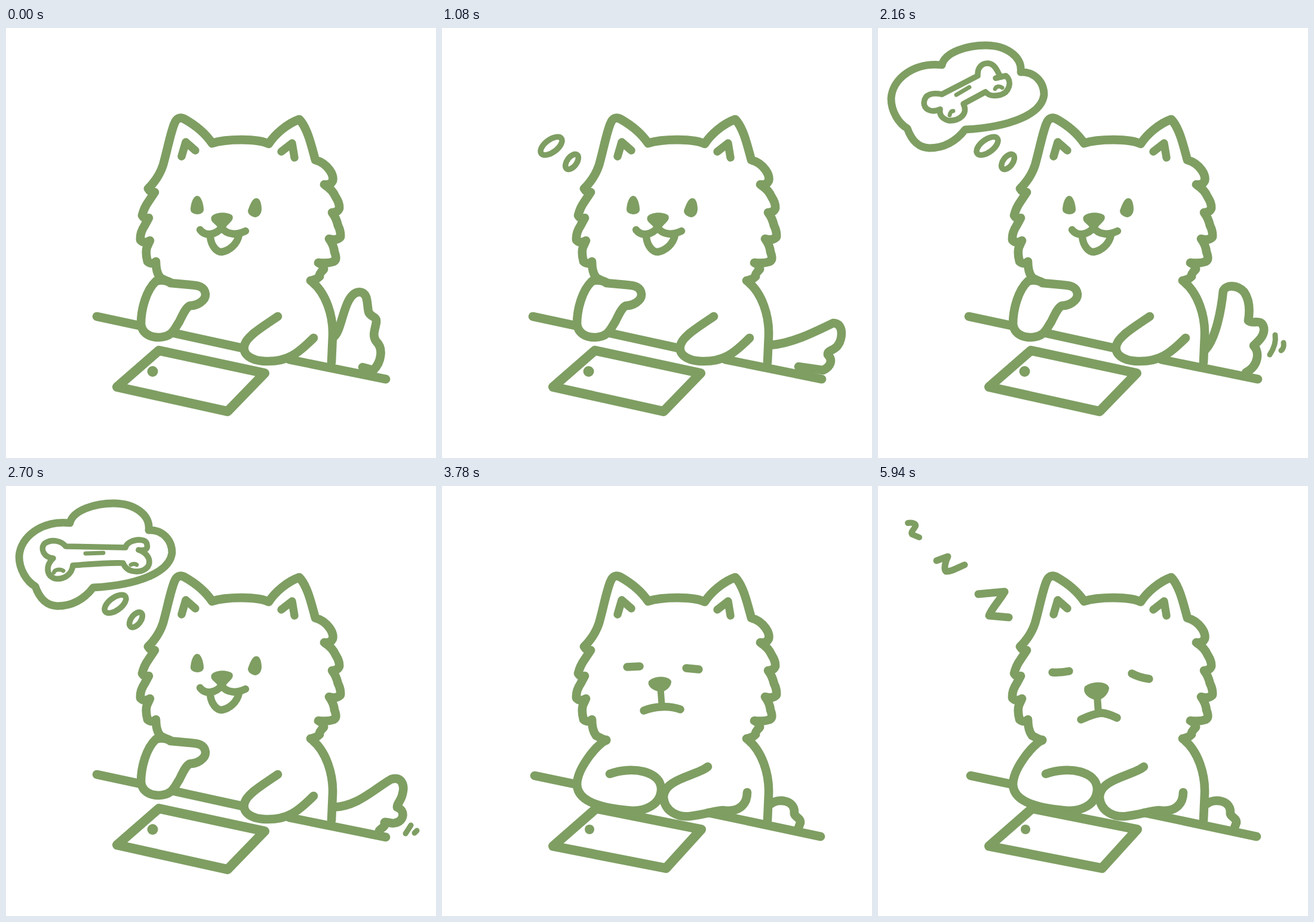
Write an HTML page that moves like this. It is 720x720 px and loops after 6480 ms.

```html
<!DOCTYPE html>
<html lang="en">
<head>
<meta charset="utf-8">
<title>Daydreaming dog</title>
<style>
html, body { margin: 0; width: 100%; height: 100%; overflow: hidden; background: #fff; }
svg { display: block; width: 100vw; height: 100vh; }
path, ellipse { fill: none; stroke: #7e9e62; stroke-width: 14.6; stroke-linecap: round; stroke-linejoin: round; }
.solid { fill: #7e9e62; stroke: none; }
.face path:not(.solid), .inner path { stroke-width: 13.4; }
.face .mouth:not(.solid) { stroke-width: 12.4; }
.phone { stroke-width: 16; }
.cloud { stroke-width: 12.8; }
.bone path, .puff { stroke-width: 9.6; }
.bone .thin { stroke-width: 6.8; }
.marks path { stroke-width: 9; }
</style>
</head>
<body>
<svg viewBox="0 0 720 720">
  <!-- head and back -->
  <g>
    <path d="M275 426Q265 422 258 418Q251 409 251 391Q244 397 237 391Q233 376 236 367L241 356Q231 362 225 355Q224 343 232 331L239 318Q232 321 228 314Q231 301 239 290L249 275Q242 276 238 269C253 254 261 240 265 222C271 200 276 174 282 160Q287 147 298 152C316 162 333 175 345 193C370 185 422 185 440 194C450 178 471 160 491 153C505 167 512 200 518 221Q533 225 542 238Q549 248 547 256Q543 264 533 262Q547 271 552 283Q559 294 558 302Q555 309 546 309Q553 318 556 331Q561 341 560 350Q553 357 541 353Q549 364 550 375Q555 388 549 391Q538 395 523 393Q533 398 532 404Q523 413 525 416Q519 422 510 423C537 443 548 484 547 515L545 560"/>
  </g>
  <g class="inner">
    <path d="M294 215L301 191L317 205"/>
    <path d="M461 207L479 193L483 217"/>
  </g>

  <!-- awake pose -->
  <g data-steps="0-5">
    <path d="M152 483L222 498M282 511L396 536M474 555L636 588"/>
    <path d="M275 426Q263 420 251 424C235 439 226 470 226 496C228 512 242 518 256 518C279 517 281 505 290 492C296 480 301 468 308 465C320 465 334 457 334 446C333 433 322 431 308 430L275 427"/>
    <path d="M455 483C430 500 405 515 400 529C394 544 407 557 435 558C471 559 488 546 515 519"/>
    <path class="phone" d="M256 540L433 578L371 642L186 601Z"/>
    <ellipse class="solid" cx="245.500" cy="575" rx="9" ry="9"/>
    <g class="face">
      <path class="solid" d="M320 281C328 281 331 298 331 304C331 315 309 314 309 304C309 296 313 281 320 281Z"/>
      <path class="solid" d="M419 285C425 284 428 294 428 303C428 312 422 317 417 317C409 315 405 311 405 306C408 298 412 285 419 285Z"/>
      <path class="solid" d="M344 316C349 308 371 307 379 314C383 323 371 327 367 336L356 336C351 327 341 325 344 316Z"/>
      <path class="mouth" d="M325 338C334 350 352 346 361 334C370 347 386 347 401 340"/>
      <path class="mouth" d="M342 350C344 366 353 375 361 375C374 373 387 362 390 347"/>
    </g>
  </g>

  <!-- tails -->
  <g data-steps="0">
    <path d="M549 517C564 506 565 443 592 442C607 443 604 462 607 475C609 484 621 482 620 492C619 503 612 514 620 525C632 536 629 559 615 573L597 568"/>
  </g>
  <g data-steps="1,4">
    <path d="M548 539C566 520 575 470 578 440C583 429 602 430 613 442C622 455 623 472 620 490C628 497 642 485 646 502C648 516 635 526 629 532C639 542 638 565 616 577"/>
  </g>
  <g data-steps="2">
    <path d="M550 531C585 528 618 512 655 494C673 494 671 520 663 531C658 540 645 539 646 547C655 556 651 567 638 573L597 567"/>
  </g>
  <g data-steps="3,5">
    <path d="M548 538C590 536 615 508 645 491C662 486 668 500 664 515C662 527 654 532 655 538C669 543 667 561 652 564C644 567 632 559 634 565C636 570 629 572 625 577"/>
  </g>
  <g class="marks">
    <path data-steps="3" d="M681 561L672 574M691 568L687 573"/>
    <path data-steps="4" d="M665 514C667 527 662 538 656 547M679 527C680 533 678 538 675 540"/>
    <path data-steps="5" d="M678 568L669 582M688 577L684 581"/>
  </g>

  <!-- thought -->
  <ellipse class="puff" data-steps="1-5" rx="14.500" ry="8" transform="translate(217.500 224) rotate(-53)"/>
  <ellipse class="puff" data-steps="2-5" rx="21" ry="10.500" transform="translate(183 197.500) rotate(-37)"/>
  <path class="cloud" data-steps="3-5" d="M107 62C112 40 150 29 180 29C215 29 242 48 239 74C262 73 278 90 278 112C274 145 220 166 146 170C132 188 112 201 86 201C65 200 55 185 49 168C35 160 22 140 22 118C24 85 60 57 107 62Z"/>
  <g class="bone" data-steps="4">
    <path d="M197 84L214 80C226 90 219 108 205 112C192 115 185 113 180 107L143 127C152 145 135 156 118 155C108 152 102 146 104 136C89 143 77 136 77 125C78 110 92 108 107 111L167 80C166 65 175 59 184 59C195 60 199 70 203 78"/>
    <path class="thin" d="M131 112L153 99M120 146C121 140 124 139 126 139M196 102C198 97 204 97 208 100"/>
  </g>
  <g class="bone" data-steps="5">
    <path d="M100 101L200 103C203 89 235 85 236 98C238 105 234 109 222 107C246 115 246 140 222 143C208 144 200 139 196 129C170 128 140 131 112 133C110 150 95 157 82 155C67 150 66 133 79 121C64 120 56 105 65 96C77 88 93 92 100 101Z"/>
    <path class="thin" d="M133 113L163 112M80 145C82 139 92 139 96 142M209 132C212 130 217 130 219 132"/>
  </g>

  <!-- drowsy pose -->
  <g data-steps="6-11">
    <path d="M155 485L222 499M446 547L634 587"/>
    <path d="M275 425C255 437 226 475 226 500C227 530 270 539 310 543C340 547 367 533 367 507C366 478 320 468 281 482"/>
    <path d="M445 470C428 485 370 490 371 522C373 545 395 555 415 553C440 550 455 544 470 543C495 547 511 535 511 513"/>
    <path class="phone" d="M258 540L434 575L375 640L186 603Z"/>
    <ellipse class="solid" cx="247" cy="575" rx="8" ry="8"/>
    <path d="M551 532C562 523 590 525 590 546C588 554 601 555 600 564L597 572"/>
  </g>
  <g class="face" data-steps="6">
    <ellipse class="solid" rx="15.500" ry="10" transform="translate(320.500 296.500) rotate(-4)"/>
    <ellipse class="solid" rx="13.500" ry="9" transform="translate(419.500 300.500) rotate(-8)"/>
    <path class="solid" d="M346 320C350 309 377 307 382 315C386 326 373 329 370 336L359 334C354 330 343 329 346 320Z"/>
    <path class="mouth" d="M329 349C345 348 356 340 366 330C375 342 388 348 404 346"/>
    <path class="mouth" d="M344 349C349 364 360 368 370 368C384 367 393 358 396 347"/>
    <path d="M385 376v5M404 381v4" style="stroke-width:1"/>
  </g>
  <g class="face" data-steps="7">
    <path d="M310 303L331 302M409 305L430 307"/>
    <path class="solid" d="M346 327C354 317 380 317 384 327C384 338 373 344 367 345C358 344 343 338 346 327Z"/>
    <path d="M366 340L368 367" style="stroke-width:11"/>
    <path d="M338 376C356 369 380 367 399 374"/>
  </g>
  <g class="face" data-steps="8-11">
    <path d="M292 312Q305 313 320 310M425 314Q438 321 454 323"/>
    <path class="solid" d="M346 336C358 326 384 326 387 338C386 350 374 358 368 359C358 358 341 350 346 336Z"/>
    <path d="M367 352L369 380" style="stroke-width:12"/>
    <path d="M340 391C358 383 368 380 375 380C385 381 393 385 400 388"/>
  </g>

  <!-- snores -->
  <path data-steps="9-11" style="stroke-width:13" d="M168 181L212 177C205 190 190 205 186 217L219 220"/>
  <path data-steps="10-11" style="stroke-width:11" d="M98 125L117 118C112 128 110 140 114 143C122 144 133 137 145 132"/>
  <path data-steps="11" style="stroke-width:10" d="M50 62C56 61 64 62 63 67C60 73 54 77 57 81L69 86"/>
</svg>
<script>
const STEP = 540, COUNT = 12;

// "1,4" lists steps; "2-5" is an inclusive range
const parse = text => text.split(",").map(part => {
  const [from, to = from] = part.split("-").map(Number);
  return [from, to];
});

const parts = [...document.querySelectorAll("[data-steps]")].map(el => ({
  el, ranges: parse(el.dataset.steps)
}));

let start = null;

function draw(ms) {
  const step = Math.floor(ms / STEP) % COUNT;
  for (const { el, ranges } of parts) {
    const on = ranges.some(([from, to]) => step >= from && step <= to);
    el.style.display = on ? "" : "none";
  }
}

function tick(now) {
  if (start === null) start = now;
  draw(now - start);
  requestAnimationFrame(tick);
}

draw(0);
requestAnimationFrame(tick);
</script>
</body>
</html>
```
